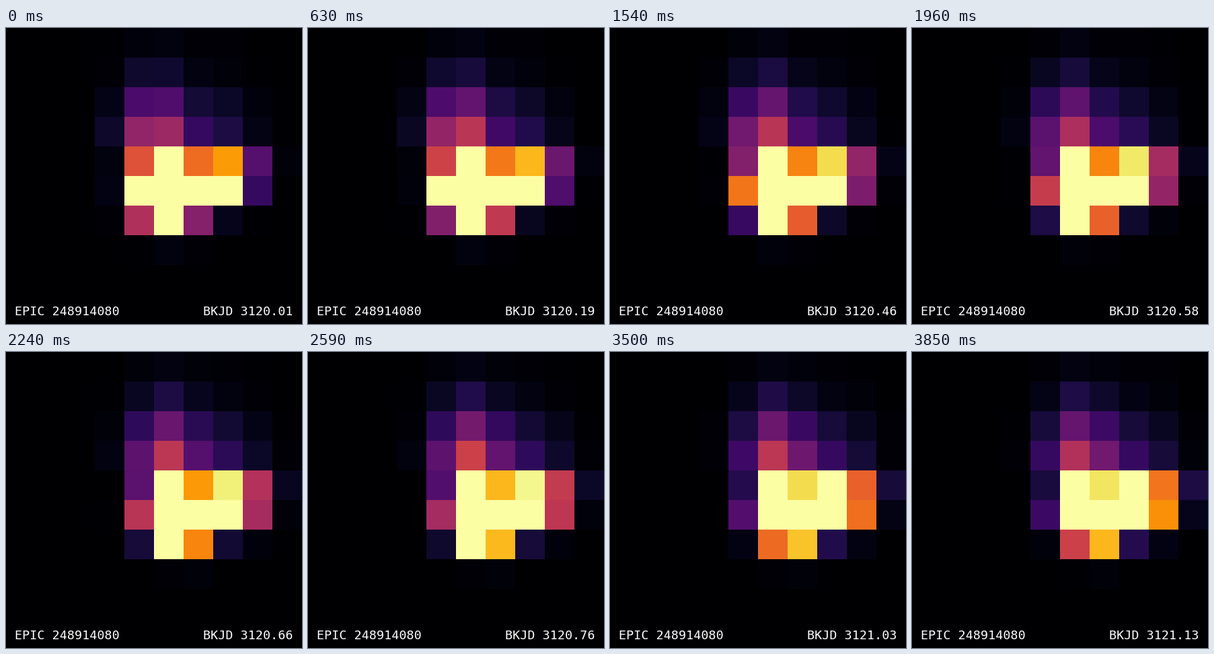
These frames come from a looping animation (440x440 px, 3.92 s). A matplotlib script:

```python
import numpy as np
import matplotlib.pyplot as plt
from matplotlib.animation import FuncAnimation

FRAMES, STEP_MS = 56, 70
GRID = 10
START_DAY, CADENCE = 3120.008, 0.0204336  # days

cols = np.arange(GRID)
rows = np.arange(GRID)[:, None]
below = np.maximum(rows - 3, 0)  # the trail leans right under row 3


def profile(*peaks):
    """Peak brightness by row, as a column padded with dark rows."""
    return np.pad(peaks, (0, GRID - len(peaks)))[:, None]


MAIN_FIRST = profile(.027, .1, .275, .49, 1.1, 2.9, 1.6, .026)
MAIN_LAST = profile(.03, .12, .29, .48, 1.15, 3.9, .98, .018)
COMPANION = profile(.01, .02, .07, .12, .83, 1.13, .05)


def streak(peak, centre, variance):
    return peak * np.exp(-(cols - centre) ** 2 / (2 * variance))


def flux(i):
    """Two stars drift to the right; the main one also flickers."""
    t = i / (FRAMES - 1)
    flicker = np.interp(i, [0, 9, 18, 28, 37, 50, 55],
                        [1, 1.12, 1.1, .96, 1.12, 1.04, 1])
    main = streak(MAIN_FIRST + (MAIN_LAST - MAIN_FIRST) * t,
                  4.52 + .14 * below + (.62 + .03 * below) * t,
                  np.where(rows < 4, .62, .36))
    companion = streak(COMPANION * (1 + .25 * t), 6.7 + .55 * t,
                       np.where(rows < 5, .7, .45))
    return flicker * main + companion


fig = plt.figure(figsize=(4, 4), dpi=110, facecolor="black")
ax = fig.add_axes([0, 0, 1, 1])
ax.axis("off")
image = ax.imshow(flux(0), cmap="inferno", vmin=0, vmax=1,
                  interpolation="nearest", aspect="auto")


def label(x, text, ha):
    return fig.text(x, 0.03, text, ha=ha, va="baseline", color="white",
                    family="DejaVu Sans Mono", size=12)


label(0.03, "EPIC 248914080", "left")
date = label(0.97, "", "right")


def draw(i):
    image.set_data(flux(i))
    date.set_text(f"BKJD {START_DAY + CADENCE * i:.2f}")
    return image, date


anim = FuncAnimation(fig, draw, frames=FRAMES, interval=STEP_MS,
                     repeat=True, repeat_delay=0)
plt.show()
```
